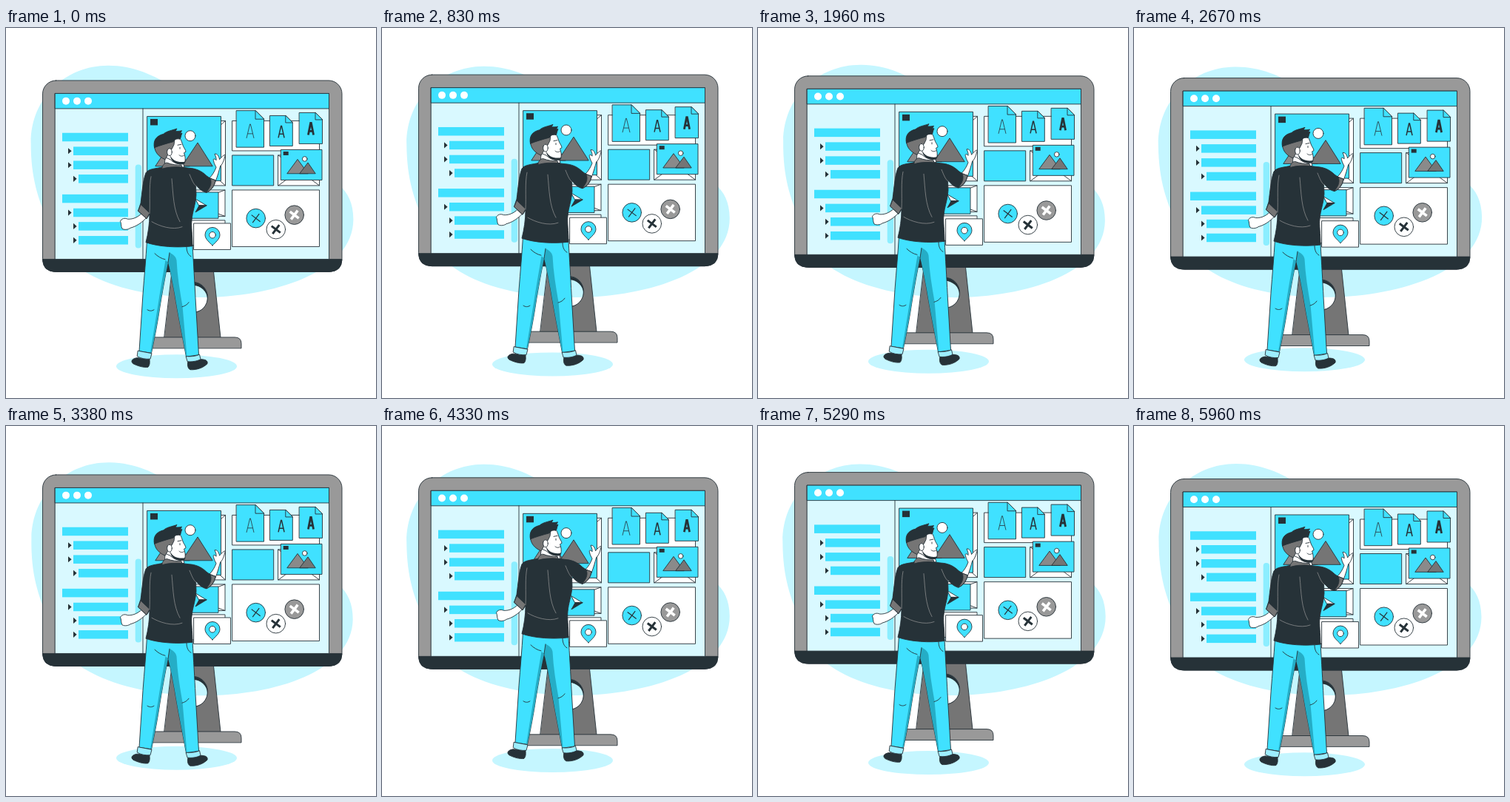
Recreate the animation shown at these times as an HTML page. Size 500 px wide and 500 px high, loop 6 s.

```html
<!DOCTYPE html>
<html lang="en">
<head>
<meta charset="utf-8">
<title>Designer at a large screen</title>
<style>
  html, body { margin: 0; width: 100%; height: 100%; overflow: hidden; background: #fff; }
  svg { display: block; width: 100vw; height: 100vh; }
  .line { stroke: #263238; stroke-width: .9; stroke-linejoin: round; stroke-linecap: round; }
  .cyan { fill: #40e1ff; }
  .pale { fill: #c5f6ff; }
  .white { fill: #fff; }
  .dark { fill: #263238; }
  .grey { fill: #999; }
  .mid { fill: #757575; }
  .none { fill: none; }
  .shade { fill: #25adc6; }
  #blob { transform-box: fill-box; transform-origin: center; }
</style>
</head>
<body>
<svg viewBox="0 0 500 500" xmlns="http://www.w3.org/2000/svg">
  <path id="blob" class="pale" d="M138 51C80 51 33.500 95 33.500 155C33.500 205 44 232 58 265C61 313 130 364 262 364C360 364 469.500 330 469.500 258C469.500 215 440 200 400 190C340 175 320 140 280 110C262 98 243 89 225 80C200 64 172 51 138 51Z"/>
  <ellipse id="shadow" class="pale" cx="230.500" cy="457.300" rx="81.500" ry="16"/>

  <g id="monitor">
    <path class="mid line" fill-rule="evenodd" d="M225 325H280L290 419H214ZM233.500 364.500a19.500 20.500 0 1 0 39 0a19.500 20.500 0 1 0 -39 0Z"/>
    <path class="dark" fill-rule="evenodd" d="M233.500 364.500a19.500 20.500 0 1 0 39 0a19.500 20.500 0 1 0 -39 0ZM233.500 366.500a19.200 18 0 1 0 38.400 0a19.200 18 0 1 0 -38.400 0Z"/>
    <path class="grey line" d="M186 433V427Q186 418.500 195 418.500H309Q318 418.500 318 427V433Z"/>

    <rect class="grey line" x="49.500" y="71.500" width="404.500" height="258.500" rx="18"/>
    <path class="dark line" d="M49.500 313H454Q454 330 436 330H67.500Q49.500 330 49.500 313Z"/>
    <rect class="line" fill="#d9f9ff" x="66.500" y="89" width="370" height="224"/>
    <rect class="cyan line" x="66.500" y="89" width="370" height="20.500"/>
    <g class="white">
      <circle cx="81" cy="99.200" r="5"/><circle cx="96" cy="99.200" r="5"/><circle cx="111" cy="99.200" r="5"/>
    </g>
    <path class="line" d="M185 109.500V313"/>
    <g id="menu"></g>
    <rect x="174.700" y="185" width="8.300" height="113" rx="4" fill="#8ceeff"/>

    <!-- large picture -->
    <path class="white line" d="M197 126H296.500V213.500H197ZL296.500 213.500M296.500 126L197 213.500"/>
    <rect class="cyan line" x="191" y="120" width="99.500" height="87"/>
    <rect class="dark" x="195" y="123.500" width="10" height="8.500"/>
    <circle class="white line" cx="249" cy="146.300" r="7"/>
    <path class="line" fill="#8a8a8a" d="M202 187L225 152L248 187Z"/>
    <path class="mid line" d="M238 187L259 155.500L279 187Z"/>

    <!-- cursor and pin cards -->
    <path class="white line" d="M200 219.500H296V255H200ZL296 255M296 219.500L200 255"/>
    <rect class="cyan line" x="196" y="222.500" width="91" height="35.300"/>
    <path class="white line" d="M256 231.500L271 240.500H261Z"/>
    <path class="dark line" d="M271 240.500L256 249.500L261 240.500Z"/>
    <rect class="white line" x="249" y="260.500" width="47" height="34"/>
    <rect class="white line" x="254" y="264.500" width="49.500" height="35.500"/>
    <path class="cyan line" d="M279 294.500C275 290 269 286 269 280A10 10 0 0 1 289 280C289 286 283 290 279 294.500Z"/>
    <circle class="white line" cx="279" cy="280.300" r="4.300"/>

    <!-- type files -->
    <rect class="white line" x="306" y="126" width="117.500" height="40.500"/>
    <g id="files"></g>

    <!-- small picture -->
    <rect class="cyan line" x="306" y="172.500" width="55.700" height="41"/>
    <path class="white line" d="M368 172.500H423.500V213.500H368ZL423.500 213.500M423.500 172.500L368 213.500"/>
    <rect class="cyan line" x="371.700" y="165" width="55.300" height="41"/>
    <rect class="dark" x="374.700" y="167.500" width="7" height="5"/>
    <circle class="white line" cx="403.700" cy="177.500" r="3.300"/>
    <path class="line" fill="#8a8a8a" d="M380 197L394 178L408 197Z"/>
    <path class="mid line" d="M397 197L408 182.500L418 197Z"/>

    <rect class="white line" x="306" y="219.500" width="117.500" height="76.500"/>
    <g id="badges"></g>
  </g>

  <g id="person">
    <!-- shoes and trousers -->
    <path class="dark line" d="M177 446C170 447 168 451 172 454C178 457 186 459.500 192 458.500C195 455 194 451 194 448Z"/>
    <path class="dark line" d="M246 450.500C244.500 456 246 461 249 462C257 462.500 266 460 272 454C273 450 270 448 263 448Z"/>
    <path class="cyan line" d="M222 290L252 293C253.500 320 255 345 256 365L260.500 442L243.500 444.500C238 415 232 385 228 360C225 343 222 328 219 317Z"/>
    <path class="cyan line" d="M190.500 288C189 312 187 335 185 360L180 437L196.500 439.500C201 418 205 397 207.500 380C211 358 215 336 219 317L228 308L230 290Z"/>
    <path class="cyan" d="M217 288H250V308L228 312L220 316Z"/>
    <path class="shade" d="M219 317L215.500 314C212 335 208.500 354 205.500 374L195 439H196.500C201 418 205 397 207.500 380C211 358 215 336 219 317Z"/>
    <path class="shade" d="M219.200 317L221 304C226 306 229.500 309 230.500 314C231.500 335 235 356 238.500 376L244.500 444H243.500C238 415 232 385 228 360C225 343 222 328 219.200 317Z"/>
    <path class="none line" d="M219 317L221 304M201 305C205 309 210 312 215 313M244 296C244 302 246 307 250 309M191 381C194 383 197 383 200 381M238 377C242 376 245 374 247 371"/>
    <path class="line" fill="#9deeff" d="M178.500 436.500L197 440L195 447.500C189 448 182 447 177.500 444Z"/>
    <path class="line" fill="#9deeff" d="M243.500 444C250 444.500 256 444 261.500 441.500L263 448C257 451 251 451.500 245.500 451Z"/>

    <!-- arms -->
    <path class="white line" d="M186 248C180 255.500 172 259 164.500 258.500C160 256.500 156 258 154.500 261.500C156 264 155 268 157 271.500C160 273.500 166 272.500 168 270.500C176 268.500 184 263 189.500 257Z"/>
    <path class="white line" d="M283 208C286 200 288 193 289.500 187C294 183 295 176 296.500 171.500C293.500 172 291 175 288.500 178C288 173.500 285 169.500 282 170.500C283.500 174 284.500 177 284 179C281.500 176 279.500 177 280.500 180C281.500 184.500 283 186 284 188.500C282 194 279 199 275 203Z"/>

    <!-- head -->
    <path class="white line" d="M215 172C215 179 214.500 184 213.500 189C222 191 233 191 241 188L239 182Z"/>
    <path class="white line" d="M217 150L235 149C237 152 238 156 239.500 160C241 163 243 165.500 243 167.500L240.500 169C242 173 243 178 241.500 182C237 186 228 184 222 178L213 174Z"/>
    <path class="mid line" d="M200.500 160C201 168 206 174 215 178L218.500 172L218 165L224 164L227 158L228 150L204 152Z"/>
    <path class="dark line" d="M200.500 162C198.500 152 203 146 213 143.500C217 139.500 225 138.500 231 136.300L229 139.500C232 140 235 139.500 237.500 139L235.500 142.500H238C236 146 236.500 149 235 150.500C231 149.500 228 150.500 226 154C218 156 208 159 200.500 162Z"/>
    <path class="dark" d="M222 172C224 179 232 182.500 242.300 181C242.300 184.500 238 185.500 232 184C226 182 222 178 222 172Z"/>
    <ellipse class="white line" cx="221" cy="168" rx="3.300" ry="5"/>
    <path class="none line" d="M232 158.500L237 157.500M235 161.500V163.500M234 172C236 174 239 174 241 172"/>

    <!-- shirt -->
    <path class="dark line" d="M212 188C203 190.500 193 190 189 196C185 206 184 222 182 237L178.500 247.500L190 258L194 252C194 265 192 278 189 290C206 296 232 297.500 252 295C252 280 250 268 251 260C252 248 256 240 257 226L256.500 212C260 217 266 222 271 222.500C277 220 282 214 283 206C278 204.500 275 203 271 200C264 193 256 190 247 189.500L239 188.500C230 186 220 186 212 188Z"/>
    <path class="mid line" d="M211.500 187C214 183 216 182 218 182.500C224 185 231 185.500 237 185.500L238 188.500C229 187.500 219 188 211 190.500Z"/>
    <path class="mid line" d="M182 239L178.500 247.500L190 258L194 250.500Z"/>
    <path class="mid line" d="M270.500 222.500C277 220 282 214 283 206L276 203.500C279 211 275 217 270.500 222.500Z"/>
    <path class="none" stroke="#999" stroke-width=".7" stroke-linecap="round" d="M196 201C193 215 195 232 194 251M224 204C226 225 226 246 235 262M197 262C207 268 225 274 238 269M248 198C251 205 253 211 257 214"/>
  </g>
</svg>
<script>
  const get = id => document.getElementById(id);

  // sidebar rows: left edge, top
  get('menu').innerHTML = [
    [76, 142.3], [91, 161], [91, 180], [98, 198.6],
    [76, 225.4], [91, 244.3], [98, 262.7], [98, 281.6]
  ].map(([x, y]) =>
    `<rect class="cyan" x="${x}" y="${y}" width="${165 - x}" height="11.500"/>` +
    (x > 76 ? `<path class="dark" d="M${x - 7} ${y + 1.7}l4.600 4.100l-4.600 4.100Z"/>` : '')
  ).join('');

  // files: left, top, width, height, fold, letter top, letter height, half width, weight
  get('files').innerHTML = [
    [311.5, 112.2, 37, 49.5, 11.5, 130.5, 19, 5, 0.8],
    [356.8, 119, 30.5, 41, 9.5, 133, 16, 4, 1.5],
    [396.5, 115, 31, 42, 9.5, 129, 16, 3.6, 2.8]
  ].map(([x, y, w, h, f, top, size, half, weight]) => {
    const mid = x + w / 2;
    return `<path class="cyan line" d="M${x} ${y}h${w - f}l${f} ${f}v${h - f}h${-w}Z"/>
      <path class="cyan line" d="M${x + w - f} ${y}v${f}h${f}Z"/>
      <path class="none" stroke="#263238" stroke-width="${weight}" d="M${mid - half} ${top + size}L${mid - .4} ${top}h.8L${mid + half} ${top + size}M${mid - half * .65} ${top + size * .68}h${half * 1.3}"/>`;
  }).join('');

  // round badges: centre, fill, cross colour, cross weight
  get('badges').innerHTML = [
    [337.7, 257.7, '#40e1ff', '#263238', 1.2],
    [364.8, 272.7, '#fff', '#263238', 3],
    [389.7, 253.2, '#999', '#fff', 3.6]
  ].map(([x, y, fill, ink, weight]) =>
    `<g transform="translate(${x} ${y})"><circle class="line" r="12.800" fill="${fill}"/>
      <path transform="rotate(-8)" stroke="${ink}" stroke-width="${weight}" d="M-5.300 -5.300L5.300 5.300M5.300 -5.300L-5.300 5.300"/></g>`
  ).join('');

  const LOOP = 6000, STEP = 1000 / 24;
  const blob = get('blob');
  const floats = [['monitor', 1500], ['person', 3000], ['shadow', 6000]]
    .map(([id, period]) => [get(id), period]);

  const phase = (t, period) => (t % period) / period;
  // up 10 and back, linear
  const lift = p => -10 * (1 - Math.abs(1 - 2 * p));
  // 0 -> 1 -> -1 -> 0, linear
  const sway = p => p < .25 ? 4 * p : p < .75 ? 2 - 4 * p : 4 * p - 4;

  function draw(ms) {
    const t = (Math.floor((ms % LOOP + 5) / STEP) + 1) * STEP;
    for (const [part, period] of floats)
      part.setAttribute('transform', `translate(0 ${lift(phase(t, period)).toFixed(3)})`);
    blob.style.transform = `rotate(${sway(phase(t, 1500)).toFixed(4)}deg)`;
  }

  const start = performance.now();
  function tick() {
    draw(performance.now() - start);
    requestAnimationFrame(tick);
  }
  tick();
</script>
</body>
</html>
```
